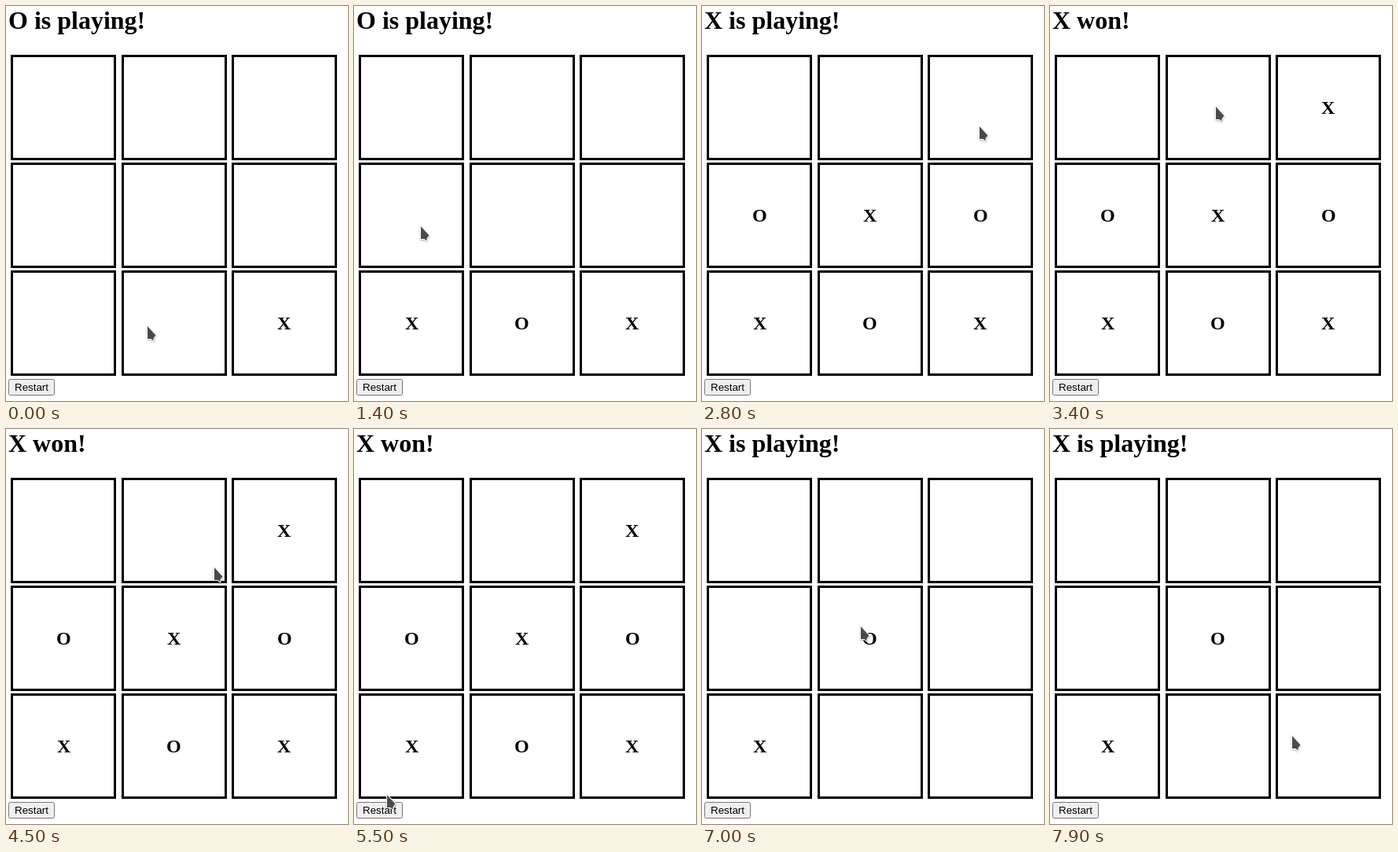
These frames come from a looping animation (435x502 px, 8000 ms). An HTML page:

```html
<!DOCTYPE html>
<html lang="en">
<head>
<meta charset="utf-8">
<title>Noughts and crosses</title>
<style>
  html, body { margin: 0; width: 100%; height: 100%; overflow: hidden; background: #fff; }
  svg { display: block; }
  text { font: bold 24px "Liberation Serif", "Times New Roman", serif; }
  #title { font-size: 32px; }
  #cells rect { fill: none; stroke: #000; stroke-width: 3; }
  #button rect { fill: #efefef; stroke: #767676; }
  #button.hover rect { fill: #e5e5e5; stroke: #4f4f4f; }
  #button text { font: 13.333px "Liberation Sans", Arial, sans-serif; }
  #cursor { fill: #4a4a4a; stroke: #fff; stroke-width: 2; paint-order: stroke; stroke-linejoin: round;
    filter: drop-shadow(0 1px 1px rgba(0, 0, 0, .3)); }
</style>
</head>
<body>
<svg width="435" height="502" viewBox="0 0 435 502">
  <text id="title" x="3" y="29"></text>
  <g id="cells"></g>
  <g id="button">
    <rect x="3.5" y="474.5" width="58" height="20" rx="2"/>
    <text x="11" y="489">Restart</text>
  </g>
  <path id="cursor" d="M0 0V16H4.5L7.5 18.5V15.5L10.5 11.5Z"/>
</svg>
<script>
const STEP = 100, STEPS = 80;
const PITCH_X = 421 / 3, PITCH_Y = 137;
const LINES = "012 345 678 036 147 258 048 246".split(" ");
const $ = id => document.getElementById(id);

// The pointer reaches (x, y) at a step, waits, may click, then leaves.
const stop = (at, x, y, wait = 0, click = false) => ({ at, x, y, leave: at + wait, click });
const stops = [
  stop(0, 180, 407),
  stop(1, 187, 406, 3, true),
  stop(5, 208, 393, 4),
  stop(12, 88, 390, 0, true),
  stop(14, 85, 280, 1, true),
  stop(19, 200, 288, 0, true),
  stop(21, 342, 295, 3, true),
  stop(29, 354, 136, 0, true),
  stop(34, 211, 128),
  stop(39, 119, 276, 3),
  stop(47, 344, 122),
  stop(51, 159, 345),
  stop(55, 42, 465),
  stop(57, 38, 479, 2, true),
  stop(63, 73, 400, 0, true),
  stop(70, 202, 251, 0, true),
  stop(75, 233, 377, 1),
  stop(79, 308, 390, 1)
];

const cells = Array.from({ length: 9 }, (_, i) => {
  const col = i % 3, top = 62 + PITCH_Y * Math.floor(i / 3);
  const left = Math.round(6.25 + PITCH_X * col);
  $("cells").insertAdjacentHTML("beforeend",
    `<rect x="${left + 1.5}" y="${top + 1.5}" width="131" height="131"/><text y="${top + 75}"></text>`);
  return { text: $("cells").lastElementChild, centre: 73.25 + PITCH_X * col };
});

// Replays all clicks up to a step.
function gameAt(step) {
  let board = Array(9).fill(""), turn = "O", won = "";
  board[8] = "X";
  for (const { x, y, leave, click } of stops) {
    if (!click || leave > step) continue;
    if (y > 472) {
      board = Array(9).fill("");
      turn = "X";
      won = "";
      continue;
    }
    board[Math.floor((x - 3) / PITCH_X) + 3 * Math.floor((y - 60) / PITCH_Y)] = turn;
    if (LINES.some(line => [...line].every(i => board[i] === turn))) won = turn;
    turn = turn === "X" ? "O" : "X";
  }
  return { board, title: won ? won + " won!" : turn + " is playing!" };
}

function pointerAt(step) {
  const i = stops.findLastIndex(s => s.at <= step);
  const from = stops[i], to = stops[i + 1] || from;
  const k = step <= from.leave ? 0 : (step - from.leave) / (to.at - from.leave);
  const ease = k * k * (3 - 2 * k);
  return [from.x + (to.x - from.x) * ease, from.y + (to.y - from.y) * ease];
}

function draw(step) {
  const { board, title } = gameAt(step);
  $("title").textContent = title;
  cells.forEach(({ text, centre }, i) => {
    text.textContent = board[i];
    // Marks are centred on whole pixels.
    text.setAttribute("x", Math.round(centre - text.getComputedTextLength() / 2));
  });

  const [x, y] = pointerAt(step);
  $("button").classList.toggle("hover", x > 3 && x < 62 && y > 474 && y < 495);
  $("cursor").setAttribute("transform", `translate(${Math.round(x)} ${Math.round(y)})`);
}

function tick() {
  draw(Math.floor(performance.now() / STEP) % STEPS);
  requestAnimationFrame(tick);
}
tick();
</script>
</body>
</html>
```
